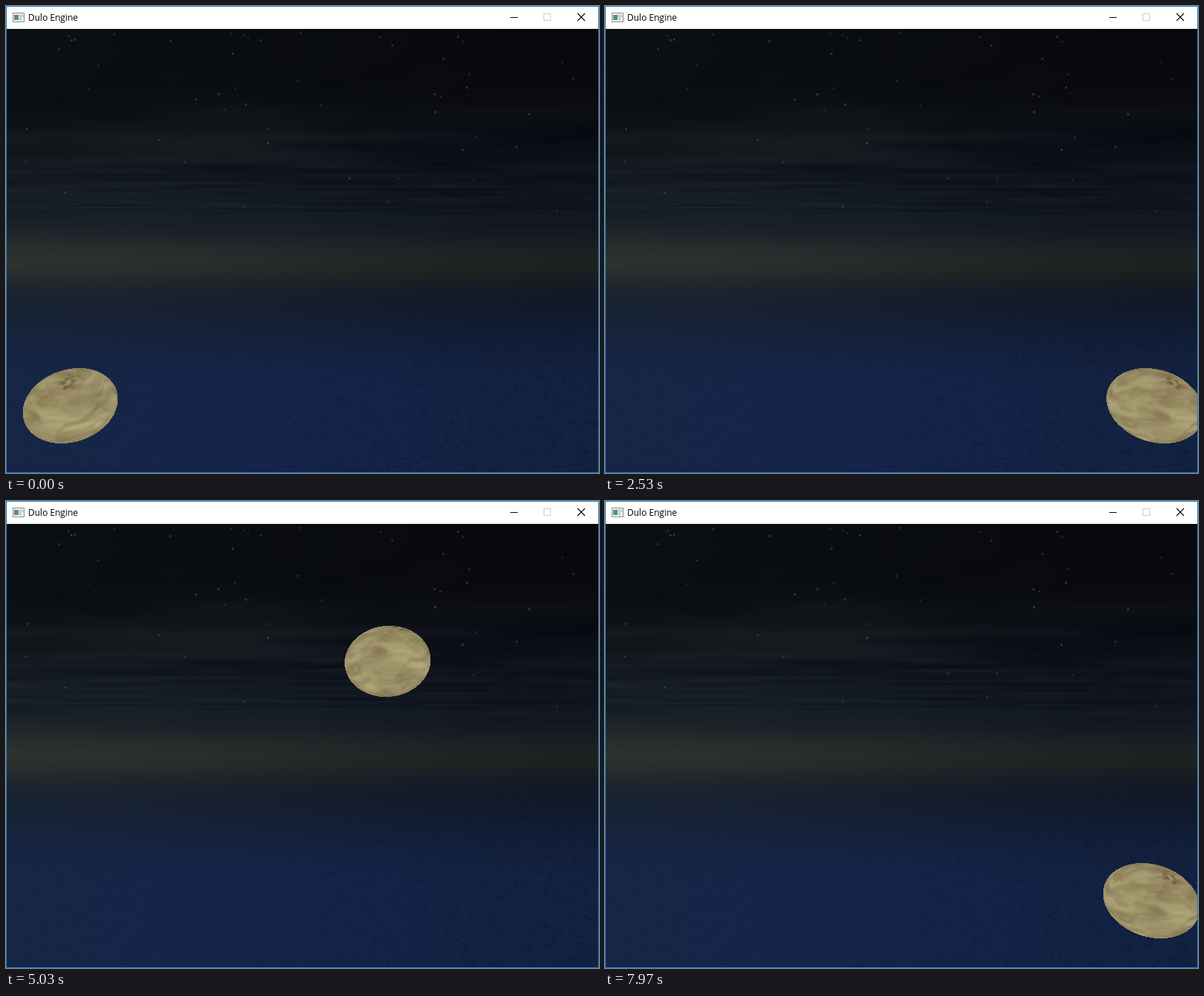
These frames come from a looping animation (802 px wide and 632 px high, 8.63 s). An HTML page with a canvas:

```html
<!DOCTYPE html>
<html lang="en">
<head>
<meta charset="utf-8">
<title>Dulo Engine</title>
<style>
  html, body { margin: 0; width: 100%; height: 100%; overflow: hidden; background: #fff; }
  canvas { position: absolute; left: 0; top: 0; display: block; }
  #title {
    position: absolute; left: 30px; top: 7px;
    font: 12px/17px "Open Sans", "Noto Sans", sans-serif;
    color: #000; white-space: pre;
  }
</style>
</head>
<body>
<canvas id="stage" width="802" height="632"></canvas>
<div id="title">Dulo Engine</div>
<script>
const W = 802, H = 632, BAR = 31, LOOP = 8630, START = 400, END = 7970;
const ctx = document.getElementById('stage').getContext('2d');

const lerp = (a, b, k) => a + (b - a) * k;
const clamp = (v, lo = 0, hi = 1) => Math.min(hi, Math.max(lo, v));
const smooth = k => k * k * (3 - 2 * k);
const bell = d => Math.exp(-d * d);
const mix = (a, b, k) => a.map((v, i) => lerp(v, b[i], k));

function makeCanvas(w, h) {
  const c = document.createElement('canvas');
  c.width = w;
  c.height = h;
  return c;
}

// --- value noise ---
function hash(x, y, z) {
  let h = Math.imul(x, 374761393) ^ Math.imul(y, 668265263) ^ Math.imul(z, 1442695041);
  h = Math.imul(h ^ (h >>> 13), 1274126177);
  h = Math.imul(h ^ (h >>> 15), 739982445);
  return ((h ^ (h >>> 16)) >>> 0) / 4294967296;
}

function noise(x, y, z) {
  const i = Math.floor(x), j = Math.floor(y), k = Math.floor(z);
  const u = smooth(x - i), v = smooth(y - j), w = smooth(z - k);
  const edge = (b, c) => lerp(hash(i, b, c), hash(i + 1, b, c), u);
  const face = c => lerp(edge(j, c), edge(j + 1, c), v);
  return lerp(face(k), face(k + 1), w);
}

function fbm(x, y, z, octaves) {
  let sum = 0, amp = 0.5, total = 0;
  for (let o = 0; o < octaves; o++) {
    sum += amp * noise(x, y, z);
    total += amp;
    amp *= 0.5;
    x *= 2.03; y *= 2.03; z = z * 2.03 + 7;
  }
  return sum / total;
}

// --- night sky: colours at the left and right side ---
const TOP = [[11, 15, 17], [8, 9, 13]];
const HAZE = [[25, 33, 41], [16, 22, 33]];
const GLOW = [[20, 16, 6], [13, 12, 0]];
const SEA = [[22, 38, 70], [19, 34, 65]];

function paintSky(g) {
  const img = g.createImageData(W, H), px = img.data;
  for (let y = BAR; y < H; y++) {
    const haze = clamp((y - 100) / 200), sea = smooth(clamp((y - 350) / 170));
    const glow = bell((y - 344) / 33);
    const cloud = clamp((y - 60) / 120) * clamp((325 - y) / 50);
    const thin = lerp(45, 9, clamp((y - 100) / 180));
    const [left, right] = [0, 1].map(i =>
      mix(mix(TOP[i], HAZE[i], haze), SEA[i], sea).map((v, c) => v + GLOW[i][c] * glow));
    for (let x = 0; x < W; x++) {
      const side = smooth(x / W), o = (y * W + x) * 4;
      let add = 8 * bell((x - 310) / 130) * bell((y - 182) / 24);
      if (cloud > 0) add += cloud * 15 * (fbm(x / 150, y / thin, 3, 3) - 0.5);
      if (sea > 0) {
        const ripple = noise((x + y * 0.8) / 7, (y - x * 0.6) / 3, 9);
        add -= sea * clamp(ripple - 0.6) * lerp(3, 16, side);
      }
      const blue = sea * 6 * bell((x - 370) / 230);
      const color = mix(left, right, side);
      px[o] = color[0] + add;
      px[o + 1] = color[1] + add;
      px[o + 2] = color[2] + add + blue;
      px[o + 3] = 255;
    }
  }
  g.putImageData(img, 0, 0);

  for (let i = 0; i < 50; i++) {
    const x = Math.floor(W * hash(i, 1, 5));
    const y = Math.floor(36 + 250 * hash(i, 2, 5) ** 1.8);
    const level = 0.08 + 0.12 * hash(i, 3, 5);
    box(g, `rgba(170,180,180,${level})`, x - 1, y - 1, 3, 3);
    box(g, `rgba(170,180,180,${level})`, x, y, 1, 1);
  }
}

function box(g, color, x, y, w, h) {
  g.fillStyle = color;
  g.fillRect(x, y, w, h);
}

function paintFrame(g) {
  box(g, '#fff', 0, 0, W, BAR);
  // window icon
  box(g, '#8c8c8c', 9, 9, 16, 13);
  box(g, '#f4f4f4', 10, 10, 14, 11);
  box(g, '#4f8f86', 11, 12, 6, 7);
  box(g, '#c8ccd0', 18, 11, 3, 9);
  box(g, '#8a97a4', 22, 12, 1, 3);
  // buttons
  box(g, '#000', 682, 15, 10, 1);
  g.lineWidth = 1;
  g.strokeStyle = '#ccc';
  g.strokeRect(727.5, 10.5, 9, 9);
  g.strokeStyle = '#000';
  g.lineWidth = 1.1;
  g.beginPath();
  g.moveTo(773, 10); g.lineTo(783, 20);
  g.moveTo(783, 10); g.lineTo(773, 20);
  g.stroke();
}

function paintBorder(g) {
  g.strokeStyle = '#1883d7';
  g.lineWidth = 1;
  g.strokeRect(0.5, 0.5, W - 1, H - 1);
}

// --- planet surface, stored by longitude and latitude ---
const TW = 600, TH = 300;
const DARK = [130, 116, 80], LIGHT = [176, 167, 122];
const CRATER = [0.17, -0.81, -0.56];

function makeSurface() {
  const tex = new Uint8ClampedArray(TW * TH * 3);
  for (let j = 0; j < TH; j++) {
    const lat = ((j + 0.5) / TH - 0.5) * Math.PI;
    for (let i = 0; i < TW; i++) {
      const lon = ((i + 0.5) / TW - 0.5) * 2 * Math.PI;
      const x = Math.sin(lon) * Math.cos(lat), y = Math.sin(lat), z = -Math.cos(lon) * Math.cos(lat);
      const warp = fbm(x * 2.4 + 5, y * 2.4 + 5, z * 2.4 + 5, 2) * 2;
      const n = fbm(x * 2.2 + warp + 20, y * 6 + warp + x + 20, z * 2.2 + 20, 4);
      const off = Math.hypot(x - CRATER[0], y - CRATER[1], z - CRATER[2]);
      const pit = bell(off / 0.22) * clamp(noise(x * 11, y * 11, z * 11) - 0.35);
      const k = clamp(0.57 + (n - 0.5) * 1.5 - 3 * pit, -0.4, 1);
      tex.set(mix(DARK, LIGHT, k), (j * TW + i) * 3);
    }
  }
  return tex;
}

// --- camera and ball ---
const CX = 401, CY = 331, FX = 598, FY = 492, R = 0.095;
const BW = 160, BH = 120;
const surface = makeSurface();
const ball = makeCanvas(BW, BH), ballCtx = ball.getContext('2d');
const ballImg = ballCtx.createImageData(BW, BH);

// cast one ray per pixel at a sphere of radius R and depth 1
function drawBall(cx, cy) {
  const px = ballImg.data;
  const left = Math.round(cx - BW / 2), top = Math.round(cy - BH / 2);
  const u = (cx - CX) * (1 - R * R) / FX, v = (cy - CY) * (1 - R * R) / FY;
  const c2 = u * u + v * v + 1, len = Math.sqrt(c2);
  for (let j = 0; j < BH; j++) {
    const dy = (top + j + 0.5 - CY) / FY;
    for (let i = 0; i < BW; i++) {
      const dx = (left + i + 0.5 - CX) / FX, o = (j * BW + i) * 4;
      const b = dx * u + dy * v + 1, d2 = dx * dx + dy * dy + 1;
      const disc = b * b - d2 * (c2 - R * R);
      px[o + 3] = disc < 0 ? 0 : 255;
      if (disc < 0) continue;
      const s = (b - Math.sqrt(disc)) / d2;
      const nx = (dx * s - u) / R, ny = (dy * s - v) / R, nz = (s - 1) / R;
      const ti = Math.floor((Math.atan2(nx, -nz) / (2 * Math.PI) + 0.5) * TW) % TW;
      const tj = clamp(Math.floor((Math.asin(clamp(ny, -1, 1)) / Math.PI + 0.5) * TH), 0, TH - 1);
      const facing = -(nx * u + ny * v + nz) / len;
      const shade = 0.9 + 0.1 * clamp(facing * 1.6);
      for (let c = 0; c < 3; c++) px[o + c] = surface[(tj * TW + ti) * 3 + c] * shade;
    }
  }
  ballCtx.putImageData(ballImg, 0, 0);
  ctx.drawImage(ball, left, top);
}

// --- motion: key times and places, joined by a smooth curve ---
const path = [
  [400, 87], [1230, 204], [1770, 267.5], [2130, 427.5], [2530, 743.5], [2680, 785],
  [3500, 732], [4300, 732], [5030, 516.5], [5730, 313], [6100, 261], [6430, 307],
  [6630, 325], [7530, 702], [7970, 739]
];
const slope = i => (path[i + 1][1] - path[i][1]) / (path[i + 1][0] - path[i][0]);

function tangent(i) {
  if (i === 0 || i === path.length - 1) return 0;
  const a = slope(i - 1), b = slope(i);
  return a * b <= 0 ? 0 : 2 * a * b / (a + b);
}

function ballX(t) {
  let i = 0;
  while (i < path.length - 2 && t > path[i + 1][0]) i++;
  const [t0, x0] = path[i], [t1, x1] = path[i + 1];
  const d = t1 - t0, k = (t - t0) / d;
  return lerp(x0, x1, smooth(k))
    + d * k * (1 - k) * ((1 - k) * tangent(i) - k * tangent(i + 1));
}

const FLOOR = 541, PEAK = 172, FALL = 5.35e-4, LIFT = 2.74e-4;
const RISE = 3314, COAST = 4258, APEX = 4741, LAND = 5571;
const HOP = 455, hops = [440, 1766, 2640, LAND, 6700];

function ballY(t) {
  if (t > RISE && t < COAST) return FLOOR - LIFT * (t - RISE) ** 2;
  if (t >= COAST && t < LAND) return PEAK + FALL * (t - APEX) ** 2;
  const at = hops.find(h => t >= h && t < h + HOP);
  return at ? FLOOR - FALL * (t - at) * (at + HOP - t) : FLOOR;
}

const scene = makeCanvas(W, H), sceneCtx = scene.getContext('2d');
paintSky(sceneCtx);
paintFrame(sceneCtx);

const begin = performance.now();
function draw() {
  const t = clamp((performance.now() - begin) % LOOP, START, END);
  ctx.drawImage(scene, 0, 0);
  drawBall(ballX(t), ballY(t));
  paintBorder(ctx);
  requestAnimationFrame(draw);
}
draw();
</script>
</body>
</html>
```
